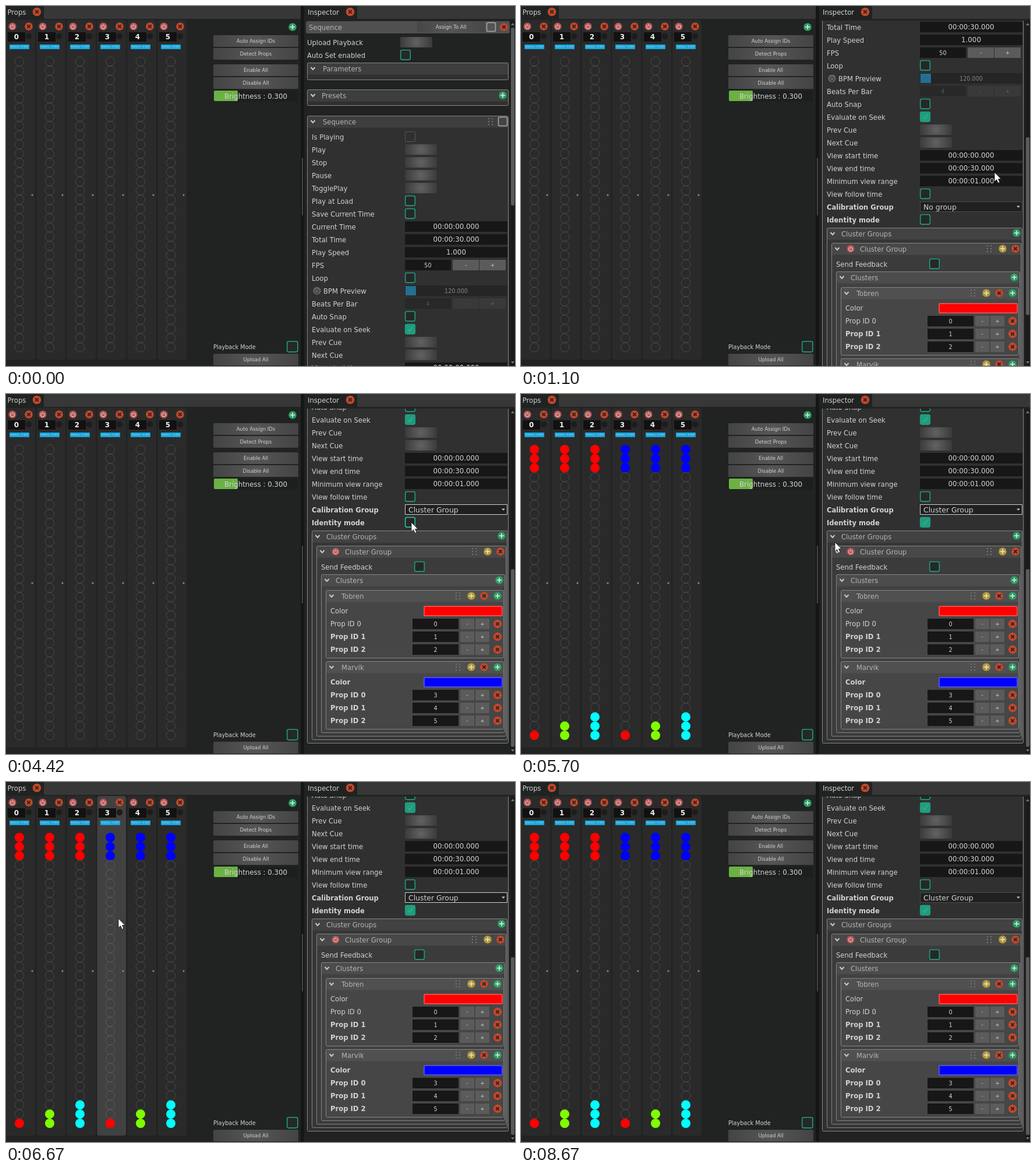
These frames come from a looping animation (874 by 617 pixels, 8810 ms). An HTML page with a canvas:

```html
<!DOCTYPE html>
<html lang="en">
<head>
<meta charset="utf-8">
<title>Props and Inspector</title>
<style>
html, body { margin: 0; width: 100%; height: 100%; overflow: hidden; background: #202322; }
canvas { display: block; }
</style>
</head>
<body>
<canvas id="stage" width="874" height="617"></canvas>
<script>
const LOOP = 8810;
const g = document.getElementById('stage').getContext('2d');
const GREEN = '#27a063', RED = '#c5482a', YELLOW = '#b39a2e', TEAL = '#209c80', LIGHT = '#d2d2d2';

// Cursor path: time, x, y
const path = [
  [200, 813, 285], [1450, 813, 285], [2210, 696, 181], [2490, 696, 181], [2680, 711, 199],
  [3090, 711, 200], [3510, 727, 233], [3930, 727, 233], [4420, 696, 220], [5430, 696, 220],
  [5760, 505, 262], [6120, 53, 95], [6270, 18, 104], [6430, 60, 130], [6950, 346, 354],
  [7230, 410, 372], [7700, 711, 260], [8060, 735, 590], [8260, 738, 617]
];
const scrollSteps = [
  [200, 0], [270, 20], [340, 45], [410, 70], [480, 98], [550, 125], [620, 150], [690, 170], [750, 182],
  [890, 227], [960, 273], [1030, 318], [1100, 364], [1170, 437], [1240, 510]
];
let now = 0, cursor = null;

function cursorAt(t) {
  const i = path.findIndex(k => k[0] > t);
  if (i < 1) return null;
  const [t0, x0, y0] = path[i - 1], [t1, x1, y1] = path[i];
  const u = (t - t0) / (t1 - t0);
  return { x: Math.round(x0 + (x1 - x0) * u), y: Math.round(y0 + (y1 - y0) * u) };
}

function scrollAt(t) {
  let s = 0;
  for (const [time, value] of scrollSteps) if (t >= time) s = value;
  return s;
}

function rect(x, y, w, h, fill, r = 0, stroke, line = 1) {
  g.beginPath();
  g.roundRect(x, y, w, h, r);
  if (fill) { g.fillStyle = fill; g.fill(); }
  if (stroke) { g.strokeStyle = stroke; g.lineWidth = line; g.stroke(); }
}

function disc(x, y, r, fill, stroke, line = 1) {
  g.beginPath();
  g.arc(x, y, r, 0, 7);
  if (fill) { g.fillStyle = fill; g.fill(); }
  if (stroke) { g.strokeStyle = stroke; g.lineWidth = line; g.stroke(); }
}

function lines(points, stroke, width) {
  g.beginPath();
  points.forEach(([x, y], i) => i ? g.lineTo(x, y) : g.moveTo(x, y));
  g.strokeStyle = stroke;
  g.lineWidth = width;
  g.stroke();
}

function text(s, x, y, { size = 11.6, color = LIGHT, bold = false, align = 'left' } = {}) {
  g.font = `${bold ? 'bold ' : ''}${size}px "DejaVu Sans", sans-serif`;
  g.textAlign = align;
  g.fillStyle = color;
  g.fillText(s, x, y + size * 0.37);
}
const centered = (s, x, y, size, color = LIGHT, bold) => text(s, x, y, { size, color, bold, align: 'center' });

function plus(x, y, color = GREEN) {
  disc(x, y, 6.8, color);
  lines([[x - 4, y], [x + 4, y]], '#dcdcdc', 1.8);
  lines([[x, y - 4], [x, y + 4]], '#dcdcdc', 1.8);
}

function cross(x, y, r = 6.8) {
  disc(x, y, r, RED);
  lines([[x - 2.8, y - 2.8], [x + 2.8, y + 2.8]], '#352522', 2);
  lines([[x - 2.8, y + 2.8], [x + 2.8, y - 2.8]], '#352522', 2);
}

function power(x, y, on = true) {
  disc(x, y, 6.6, on ? '#b65252' : '#656565');
  g.beginPath();
  g.arc(x, y + 0.4, 3.4, -0.9, 4.05);
  g.strokeStyle = on ? '#e4cccc' : '#303030';
  g.lineWidth = 1.2;
  g.stroke();
  lines([[x, y - 4.2], [x, y]], g.strokeStyle, 1.2);
}

function button(x, y, w, h, label, edge = '#444', middle = '#565656') {
  const shade = g.createRadialGradient(x + w / 2, y + h / 2, 0, x + w / 2, y + h / 2, w / 2);
  shade.addColorStop(0, middle);
  shade.addColorStop(1, edge);
  rect(x, y, w, h, shade, 1.5);
  if (label) centered(label, x + w / 2, y + h / 2, 8.5);
}
const trigger = (x, y) => button(x, y - 9, 55, 18, '', '#3b3b3b', '#626262');

function checkbox(x, y, checked, size = 17) {
  const left = x + 0.7, top = y - size / 2;
  const hover = cursor && cursor.x >= x && cursor.x <= x + size && Math.abs(cursor.y - y) <= size / 2 + 1;
  rect(left, top, size - 0.4, size - 0.4, checked ? TEAL : '#252827', 2.5, hover ? '#28c29e' : TEAL, 1.6);
  if (checked) lines([[x + 5, y], [x + 8, y + 3.5], [x + 13, y - 4]], '#35b779', 1.5);
}

function field(x, y, w, value, size = 11.8, color = LIGHT, fill = '#171717') {
  rect(x, y - 9, w, 18, fill);
  centered(value, x + w / 2, y, size, color);
}

function stepper(y, value, x, w, bx, bw, gap, dim) {
  field(x, y, w, value, 9.7, dim ? '#3d6156' : LIGHT, dim ? '#282828' : '#171717');
  ['-', '+'].forEach((sign, i) => {
    const left = bx + i * (bw + gap);
    rect(left, y - 9, bw, 18, dim ? '#393939' : '#5b5b5b', 1);
    centered(sign, left + bw / 2, y, 9, dim ? '#666' : LIGHT);
  });
}

function grip(x, y) {
  g.fillStyle = '#777';
  for (let i = 0; i < 6; i++) g.fillRect(x - 4 + (i % 2) * 6, y - 6 + (i >> 1) * 5, 2, 2);
}

function frame(x, right, top, bottom, title, titleX, fill, head) {
  rect(x + 0.5, top + 0.5, right - x - 1, bottom - top - 1, fill, 2);
  rect(x + 0.5, top + 0.5, right - x - 1, 20, head, 2);
  rect(x + 0.5, top + 0.5, right - x - 1, bottom - top - 1, null, 2, '#858585');
  const cx = x + 10, cy = top + 10;
  lines([[cx - 3.5, cy - 2], [cx, cy + 2], [cx + 3.5, cy - 2]], '#c8c8c8', 2);
  text(title, titleX, cy + 0.5, { color: '#b4b4b4' });
}

function tab(x, w, label, closeX) {
  rect(x, 0, w, 23, '#202322');
  text(label, x + (x ? 6 : 2.5), 10.5);
  cross(closeX, 10, 7.3);
}

function props() {
  rect(0, 0, 506, 22, '#373737');
  tab(0, 65, 'Props', 53);
  const lit = now >= 4690;
  const tails = ['#ff0000', '#80ff00', '#00ffff'];
  for (let i = 0; i < 6; i++) {
    const x = i * 52, cx = x + 23;
    const hover = cursor && now > 5430 && cursor.x >= x && cursor.x < x + 51 && cursor.y > 24 && cursor.y < 606;
    rect(x + 0.5, 24, 49.5, 582, hover ? '#414141' : '#2a2a2a', 4);
    power(x + 11, 35);
    cross(x + 39, 35);
    rect(x + 3, 45, 30, 16, '#111');
    centered(i, x + 18, 53, 12, '#eee', true);
    disc(x + 39, 52, 5, '#1c1c1c', '#222');
    rect(x + 6, 66, 34, 8, '#18a5dc', 1);
    centered('Battery : 0.000', cx, 70, 4, '#b5e2f3');
    for (let k = 0; k < 32; k++) {
      const y = 95 + k * 490 / 31;
      const color = k < 3 ? (i < 3 ? '#ff0000' : '#0000ff') : k > 30 - i % 3 ? tails[i % 3] : null;
      if (lit && color) disc(cx, y, 8, color);
      else disc(cx, y, 7.8, null, hover ? '#5c5c5c' : '#4c4c4c', 0.9);
    }
    disc(x + 45, 324, 1.6, '#8b8b8b');
  }
  plus(492, 36);
  button(356, 50, 146, 20, 'Auto Assign IDs');
  button(356, 72, 146, 20, 'Detect Props');
  button(356, 100, 146, 20, 'Enable All');
  button(356, 122, 146, 20, 'Disable All');
  rect(357, 145, 144, 19, '#1d1f1e', 2);
  rect(357, 145, 41, 18, '#6bb144', 2);
  centered('Brightness : 0.300', 429, 154.5, 11.8);
  text('Playback Mode', 356, 584, { size: 9.7 });
  checkbox(482, 584, false, 18.5);
  button(356, 596, 146, 20, 'Upload All');
}

function cluster(top, name, color, firstId, boldFrom) {
  frame(549, 855, top, top + 117, name, 576, '#464646', '#505050');
  grip(776, top + 10);
  plus(799, top + 10, YELLOW);
  cross(821, top + 10);
  plus(844, top + 10);
  text('Color', 557, top + 36, { bold: boldFrom < 0 });
  rect(718, top + 28, 134, 16, color, 1, firstId ? '#5c5cff' : '#ff5c5c', 1.5);
  for (let i = 0; i < 3; i++) {
    const y = top + 58 + i * 22;
    text('Prop ID ' + i, 557, y, { bold: i >= boldFrom });
    stepper(y, firstId + i, 698, 79, 780, 24, 2);
    cross(844, y, 7.2);
  }
}

function dropdown(y) {
  const focused = now >= 2820 && now < 8670;
  rect(685.5, y - 8.5, 175, 17, '#202020', 0, focused ? '#d0d0d0' : '#4b4b4b');
  text(now < 3720 ? 'No group' : 'Cluster Group', 691, y, { size: 12.4 });
  g.beginPath();
  g.moveTo(851, y - 1.5);
  g.lineTo(857, y - 1.5);
  g.lineTo(854, y + 1.8);
  g.fillStyle = '#c8c8c8';
  g.fill();
}

function inspectorContent() {
  rect(515, 26, 350, 21, '#505050', 3);
  text('Sequence', 520, 36.5, { color: '#b4b4b4' });
  button(706, 27, 116, 18, 'Assign To All', '#474747', '#565656');
  rect(825.5, 28.5, 15, 15, '#555', 2, '#aaa', 1.5);
  cross(855, 36);
  text('Upload Playback', 517, 62.5);
  trigger(677, 62);
  text('Auto Set enabled', 517, 84.5);
  checkbox(677, 84);
  frame(517, 863, 97, 127, 'Parameters', 544, '#303030', '#3e3e3e');
  frame(517, 863, 143, 171, 'Presets', 542, '#303030', '#3e3e3e');
  plus(853, 153);

  frame(517, 863, 188, 1109, 'Sequence', 544, '#303030', '#3e3e3e');
  grip(832, 198);
  rect(845.5, 190.5, 15, 15, '#444', 2, '#aaa', 1.5);
  const value = s => y => field(685, y, 176, s);
  const check = on => y => checkbox(685, y, on);
  const push = y => trigger(685, y);
  const rows = [
    ['Is Playing', y => rect(685.5, y - 8.5, 17, 17, null, 1, '#565656')],
    ['Play', push], ['Stop', push], ['Pause', push], ['TogglePlay', push],
    ['Play at Load', check()], ['Save Current Time', check()],
    ['Current Time', value('00:00:00.000')], ['Total Time', value('00:00:30.000')],
    ['Play Speed', value('1.000')],
    ['FPS', y => stepper(y, 50, 685, 79, 767, 45, 1)],
    ['Loop', check()],
    ['BPM Preview', y => {
      power(534, y, false);
      field(685, y, 176, '120.000', 9.7, '#858585', '#252525');
      rect(686, y - 8, 18, 16, '#236f91');
    }],
    ['Beats Per Bar', y => stepper(y, 4, 685, 79, 767, 45, 1, true)],
    ['Auto Snap', check()], ['Evaluate on Seek', check(true)],
    ['Prev Cue', push], ['Next Cue', push],
    ['View start time', value('00:00:00.000')], ['View end time', value('00:00:30.000')],
    ['Minimum view range', value('00:00:01.000')], ['View follow time', check()],
    ['Calibration Group', dropdown], ['Identity mode', check(now >= 4690)]
  ];
  rows.forEach(([label, draw], i) => {
    const y = 224 + i * 22;
    text(label, i === 12 ? 545 : 525, y + 0.5, { bold: i > 21, size: i > 21 ? 11.5 : 11.6 });
    draw(y);
  });

  frame(525, 861, 744, 1103, 'Cluster Groups', 550, '#363636', '#424242');
  plus(851, 753);
  frame(533, 859, 770, 1097, 'Cluster Group', 582, '#3b3b3b', '#484848');
  power(566, 780);
  grip(804, 780);
  plus(827, 780, YELLOW);
  cross(849, 780);
  text('Send Feedback', 541, 806.5);
  checkbox(701, 806);
  frame(541, 857, 819, 1091, 'Clusters', 566, '#414141', '#4c4c4c');
  plus(847, 829);
  cluster(846, 'Tobren', '#ff0000', 0, 1);
  cluster(968, 'Marvik', '#0000ff', 3, -1);
}

function inspector(scroll) {
  rect(506, 0, 6, 617, '#151716');
  rect(508, 260, 2, 99, '#454747', 1);
  rect(512, 0, 362, 22, '#373737');
  tab(512, 91, 'Inspector', 591);
  g.save();
  g.beginPath();
  g.rect(512, 25, 354, 592);
  g.clip();
  const shown = cursor;
  if (cursor) cursor = { x: cursor.x, y: cursor.y + scroll };
  g.translate(0, -scroll);
  inspectorContent();
  cursor = shown;
  g.restore();

  rect(866, 25, 8, 592, '#1a1c1b');
  rect(867, 37 + scroll * 263 / 510, 6, 305, '#5a5c5b', 3);
  for (const [y, d] of [[31, -1], [611, 1]]) {
    g.beginPath();
    g.moveTo(867, y - d * 2);
    g.lineTo(873, y - d * 2);
    g.lineTo(870, y + d * 2);
    g.fillStyle = '#777';
    g.fill();
  }
}

function menu() {
  rect(686, 208, 174, 43, '#252525', 0, '#484848');
  const chosen = cursor && cursor.y > 229 ? 1 : cursor && cursor.y > 208 ? 0 : -1;
  if (chosen >= 0) rect(687, 209 + chosen * 21, 172, 20, '#4a4a4a');
  text('No group', 705, 219, { size: 12 });
  text('Cluster Group', 705, 240, { size: 12 });
}

function arrow({ x, y }) {
  g.beginPath();
  g.moveTo(x, y);
  for (const [dx, dy] of [[0, 16], [3.7, 12.6], [6.3, 18.4], [9, 17.2], [6.5, 11.5], [11.3, 11.5]]) g.lineTo(x + dx, y + dy);
  g.closePath();
  g.fillStyle = '#fff';
  g.fill();
  g.strokeStyle = '#111';
  g.lineWidth = 0.8;
  g.stroke();
}

function draw(time) {
  now = time % LOOP;
  cursor = cursorAt(now);
  rect(0, 0, 874, 617, '#202322');
  props();
  inspector(scrollAt(now));
  if (now >= 2820 && now < 3720) menu();
  if (cursor) arrow(cursor);
}

const start = performance.now();
function tick() {
  draw(performance.now() - start);
  requestAnimationFrame(tick);
}
tick();
</script>
</body>
</html>
```
